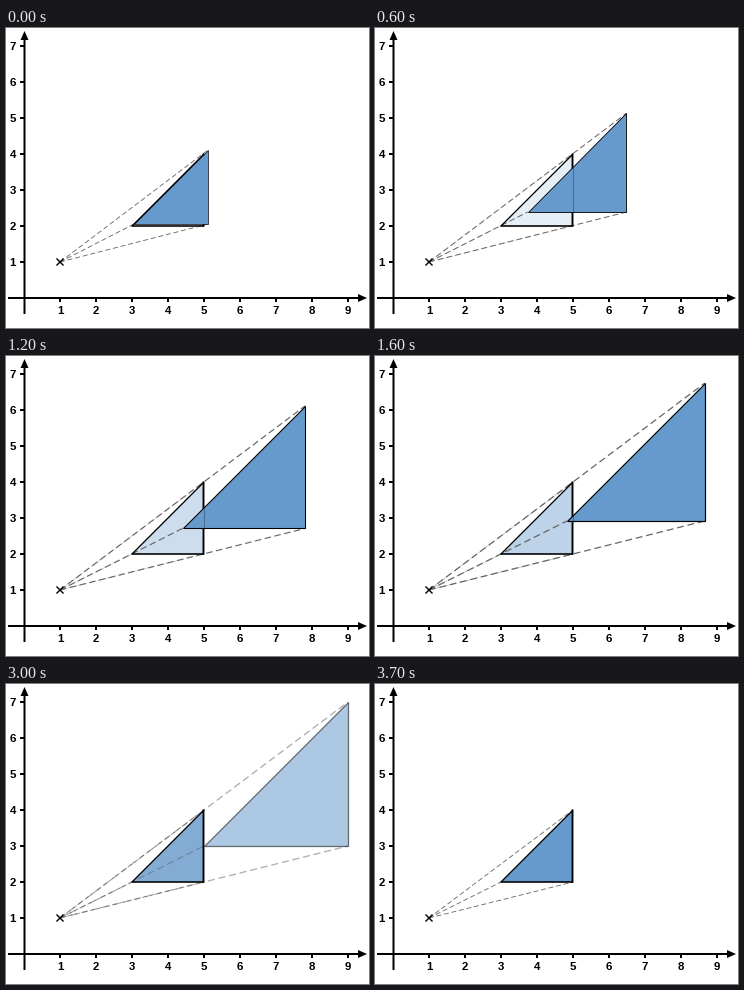
A matplotlib script that plays this animation: 363x300 px, repeating every 3800 ms.

```python
import matplotlib.pyplot as plt
import numpy as np
from matplotlib.animation import FuncAnimation

W, H, DPI = 363, 300, 100
FRAMES, INTERVAL = 38, 100
PX = 72 / DPI
BLUE = "#6699cc"
ORIGIN = np.array([18, 270])
UNIT = 36

plt.rcParams["font.family"] = "Liberation Sans"
fig = plt.figure(figsize=(W / DPI, H / DPI), dpi=DPI, facecolor="white")
ax = fig.add_axes([0, 0, 1, 1])
ax.set(xlim=(0, W), ylim=(H, 0))
ax.axis("off")


def to_px(x, y):
    return ORIGIN + UNIT * np.array([x, -y])


def stroke(xs, ys, width, color="black", **kw):
    kw = {"solid_capstyle": "butt", **kw}
    return ax.plot(xs, ys, color=color, lw=width * PX, **kw)[0]


def label(x, y, text):
    ax.text(x, y, text, size=11.5 * PX, weight="bold",
            ha="center", va="center_baseline")


def draw_axes():
    stroke([2, 354], [270, 270], 2)
    stroke([18.5, 18.5], [286, 10], 2, snap=False)
    ax.fill([361, 352, 352], [270, 266, 274], color="black", lw=0)
    ax.fill([18.5, 14.5, 22.5], [3, 12, 12], color="black", lw=0)
    for i in range(1, 10):
        x = 18 + UNIT * i
        stroke([x, x], [270, 274], 2)
        label(x, 282, str(i))
    for i in range(1, 8):
        y = 270 - UNIT * i
        stroke([14, 18], [y, y], 2)
        label(7, y, str(i))


def triangle(z, **kw):
    return ax.add_patch(plt.Polygon(corners, closed=True, zorder=z,
                                    joinstyle="miter", **kw))


def make_rays(z):
    return [stroke([], [], 1, "#666666", zorder=z, dash_capstyle="butt")
            for _ in corners]


def set_rays(rays, points, scale, alpha):
    width = 0.4 + 0.45 * scale
    dash = np.sqrt(scale) / width
    for ray, end in zip(rays, points):
        ray.set_data([center[0], end[0]], [center[1], end[1]])
        ray.set_linewidth(width * PX)
        ray.set_linestyle((0, (5 * dash, 2.7 * dash)))
        ray.set_alpha(alpha)


center = to_px(1, 1)
corners = np.array([to_px(3, 2), to_px(5, 2), to_px(5, 4)])

draw_axes()
base_fill = triangle(3, facecolor=BLUE, lw=0)
base_rays = make_rays(4)
image_rays = make_rays(4)
stroke([126, 198], [198, 126], 1.3, zorder=5)
stroke([197.5, 197.5], [125.5, 198.7], 1.9, zorder=5, snap=False)
stroke([125.5, 198], [198, 198], 1.6, zorder=5, snap=False)
image = triangle(6, facecolor=BLUE, edgecolor="black")
ghost = stroke([197.5, 197.5], [141, 184], 1, zorder=7)
cx, cy = center
for d in (1, -1):
    stroke([cx - 3.5, cx + 3.5], [cy - 3.5 * d, cy + 3.5 * d], 1.4, zorder=8)


def update(n):
    scale = np.interp(n, [0, 6, 12, 16, 18], [1.028, 1.371, 1.703, 1.915, 2])
    fade_in = n / 37
    fade_out = min(1, (37 - n) / 13)
    points = center + scale * (corners - center)
    points[:, 1] -= 2 - scale

    base_fill.set_alpha(fade_in)
    set_rays(base_rays, corners, 1, fade_in)
    set_rays(image_rays, points, scale, fade_out)

    image.set_xy(points)
    image.set_linewidth(0.62 * scale * PX)
    image.set_alpha(fade_out)

    # The covered edge shows faintly through the growing triangle.
    left, base = points[0]
    ghost.set_ydata([base - max(0, 197.5 - left), base])
    ghost.set_alpha(0.3 * min(1, n / 3) * (left < 197))


anim = FuncAnimation(fig, update, frames=FRAMES, interval=INTERVAL,
                     init_func=lambda: update(0), repeat=True, repeat_delay=0)
plt.show()
```
